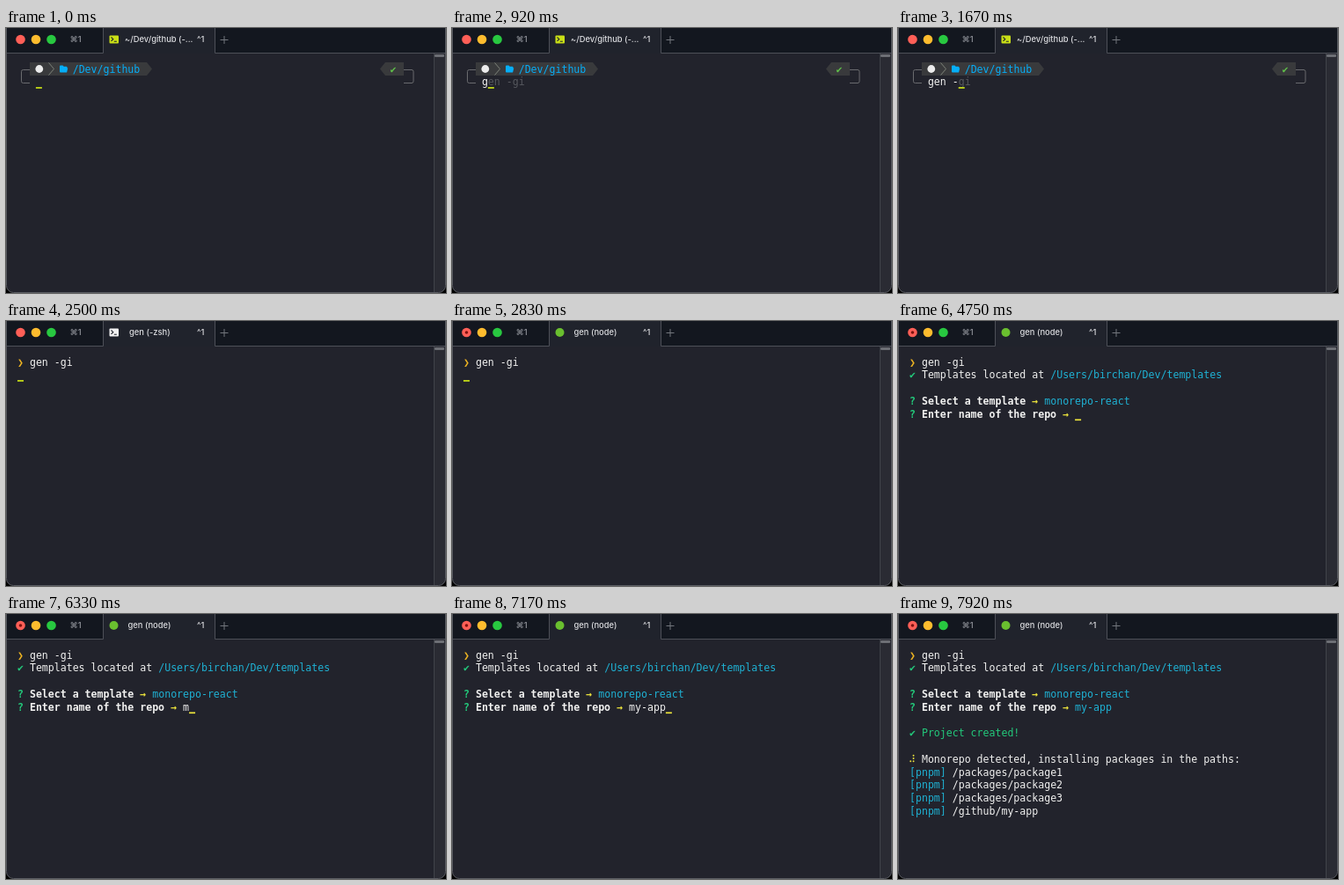
These frames come from a looping animation (500x301 px, 8000 ms). An HTML page:

```html
<!DOCTYPE html>
<html lang="en">
<head>
<meta charset="utf-8">
<title>Terminal</title>
<style>
html, body { margin: 0; width: 100%; height: 100%; overflow: hidden; background: #000; }
svg { display: block; width: 500px; height: 301px; }
text { white-space: pre; }
.mono { font: 11.57px "DejaVu Sans Mono", "DejaVu Sans", monospace; }
.ui { font: 500 9.4px Inter, "DejaVu Sans", sans-serif; }
.bold { font-weight: 700; }
</style>
</head>
<body>
<svg viewBox="0 0 500 301">
  <rect x=".5" y="-9.5" width="499" height="310" rx="8" fill="#22232c"/>
  <path d="M1 0H499V28H1Z" fill="#13171f"/>
  <path d="M110 0H238V29H110Z" fill="#20232c"/>
  <path d="M486 29H499V293Q499 300 492 300H486Z" fill="#2a2b33"/>
  <path d="M486.5 29V300" stroke="#41434a"/>
  <path d="M0 28.5H110.5V0M237.5 0V28.5H499" fill="none" stroke="#4d5058"/>
  <rect x="487" y="30" width="11" height="3" rx="1" fill="#6d6f75"/>
  <rect x=".5" y="-9.5" width="499" height="310" rx="8" fill="none" stroke="#5a5c62"/>
  <circle cx="16.5" cy="13" r="5.3" fill="#ff5f57"/>
  <circle cx="34" cy="13" r="5.3" fill="#febc2e"/>
  <circle cx="51.5" cy="13" r="5.3" fill="#28c840"/>
  <text class="ui" x="72.5" y="16.3" fill="#92959c">⌘1</text>
  <path d="M243.5 13.5H252.5M248 9V18" stroke="#73767d"/>
  <g id="view"></g>
</svg>
<script>
const LOOP = 8000, COL = 6.966, ROW = 14.78;
const WHITE = '#f1f1f0', CYAN = '#1fb1d3', GREEN = '#23c97b', YELLOW = '#ece33c',
      GRAY = '#87898e', GOLD = '#eeb422', LIME = '#c9df16', BLUE = '#06aef8';
const view = document.getElementById('view');

const colX = col => 13 + col * COL;
const rowY = row => 46.6 + row * ROW;
const esc = s => s.replace(/&/g, '&amp;').replace(/</g, '&lt;');

const put = (col, row, s, fill = WHITE, cls = '') =>
  `<text class="mono ${cls}" x="${colX(col)}" y="${rowY(row) + 4}" fill="${fill}">${esc(s)}</text>`;
const label = (x, s, cls = '') =>
  `<text class="ui ${cls}" x="${x}" y="16.4" fill="#dcdde0">${s}</text>`;

// Cursor blinks off in these spans
const blinks = [[330, 830], [3420, 3920], [4920, 5420], [5920, 6330]];
const cursor = (t, col, row, fill = YELLOW) =>
  blinks.some(([a, b]) => t >= a && t < b) ? '' :
  `<rect x="${colX(col)}" y="${rowY(row) + 5.7}" width="7" height="1.7" fill="${fill}"/>`;

// Number of keys pressed by time t
const typed = (t, times) => times.filter(k => t >= k).length;

function tab(t) {
  const shell = fill => `<rect x="117.5" y="8.5" width="10.5" height="9" rx="1" fill="${fill}"/>
    <path d="M119.5 10.5l2.3 2.2l-2.3 2.2M122.8 15.3h3" fill="none" stroke="#20232c" stroke-width="1.1"/>`;
  const key = label(217, '^1');
  if (t < 2420) return shell(LIME) + label(135, '~/Dev/github (-...') + key;
  if (t < 2750) return shell('#f2f2f2') + label(140, 'gen (-zsh)') + key;
  return '<circle cx="122.5" cy="13" r="5" fill="#6abf2f"/><circle cx="16.5" cy="13" r="1.8" fill="#7e1410"/>' +
    label(138.5, 'gen (node)') + key;
}

function prompt(t) {
  const line = 'gen -gi';
  const n = typed(t, [920, 1000, 1170, 1330, 1670, 2170, 2250]);
  return `<path d="M27 47.5H19.5Q17.5 47.5 17.5 49.5V60.5Q17.5 62.5 19.5 62.5H27M452 47.5H461Q463 47.5 463 49.5V60.5Q463 62.5 461 62.5H452"
      fill="none" stroke="#6a6b6f"/>
    <path d="M27 39H160L166 46.5L160 54H27ZM452 39H431L425 46.5L431 54H452Z" fill="#393a3c"/>
    <circle cx="37.8" cy="46.5" r="4.4" fill="#ececec"/>
    <path d="M48.5 39.5L54.5 46.5L48.5 53.5" fill="none" stroke="#7d8279"/>
    <path d="M61 43.5q0-1 1-1h2.5l1.2 1.3h2.8q1 0 1 1v.7h.8l-1.2 5H62q-1 0-1-1Z" fill="${BLUE}"/>` +
    put(9, 0, '/Dev/github', BLUE) + put(60.8, 0, '✔', '#5fbf4a') +
    put(3, 1, line.slice(0, n)) +
    (n ? put(3 + n, 1, line.slice(n), '#56585e') : '') +
    cursor(t, 3 + n, 1, LIME);
}

function question(row, s, answerCol) {
  return put(0, row, '?', GREEN, 'bold') + put(2, row, s, WHITE, 'bold') +
    put(answerCol - 2, row, '→', YELLOW, 'bold');
}

function menu(t) {
  const items = ['just-vanilla', 'monorepo-react', 'npm-package', 'pro-react', 'pro-vanilla'];
  return put(22, 3, '(Press <enter> to submit)', GRAY) + cursor(t, 48, 3) +
    put(0, 4, '❯', CYAN) +
    items.map((s, i) => put(2, 4 + i, s, i ? WHITE : CYAN)).join('');
}

function spinner(t) {
  const left = t < 7920 ? [] : [2];
  const dot = (x, i) => `<circle cx="${x}" cy="${160.8 + i * 3.2}" r=".95" fill="${YELLOW}"/>`;
  return left.map(i => dot(14.3, i)).join('') + [0, 1, 2].map(i => dot(17.6, i)).join('');
}

function install(t) {
  let out = '';
  if (t >= 7750) out += put(0, 6, '✔', GREEN) + put(2, 6, 'Project created!', GREEN);
  if (t >= 7830) {
    out += spinner(t) + put(2, 8, 'Monorepo detected, installing packages in the paths:');
    ['/packages/package1', '/packages/package2', '/packages/package3', '/github/my-app'].forEach((s, i) => {
      out += put(0, 9 + i, '[pnpm]', CYAN) + put(7, 9 + i, s);
    });
  }
  return out;
}

function session(t) {
  let out = put(0, 0, '❯', GOLD, 'bold') + put(2, 0, 'gen -gi');
  if (t < 2920) return out + cursor(t, 0, 1, LIME);
  out += put(0, 1, '✔', GREEN) + put(2, 1, 'Templates located at') +
    put(23, 1, '/Users/birchan/Dev/templates', CYAN);
  if (t < 3000) return out + cursor(t, 0, 2);
  out += question(3, 'Select a template', 22);
  if (t < 4000) return out + menu(t);

  const n = typed(t, [6330, 6500, 6750, 6920, 7000, 7170]);
  const done = t >= 7670;
  out += put(22, 3, 'monorepo-react', CYAN) + question(4, 'Enter name of the repo', 27) +
    put(27, 4, 'my-app'.slice(0, n), done ? CYAN : WHITE);
  return out + (done ? install(t) : cursor(t, 27 + n, 4));
}

let last = '';
function draw(now) {
  const t = now % LOOP;
  const html = tab(t) + (t < 2420 ? prompt(t) : session(t));
  if (html !== last) view.innerHTML = last = html;
}

const start = performance.now();
function tick() {
  draw(performance.now() - start);
  requestAnimationFrame(tick);
}
tick();
</script>
</body>
</html>
```
